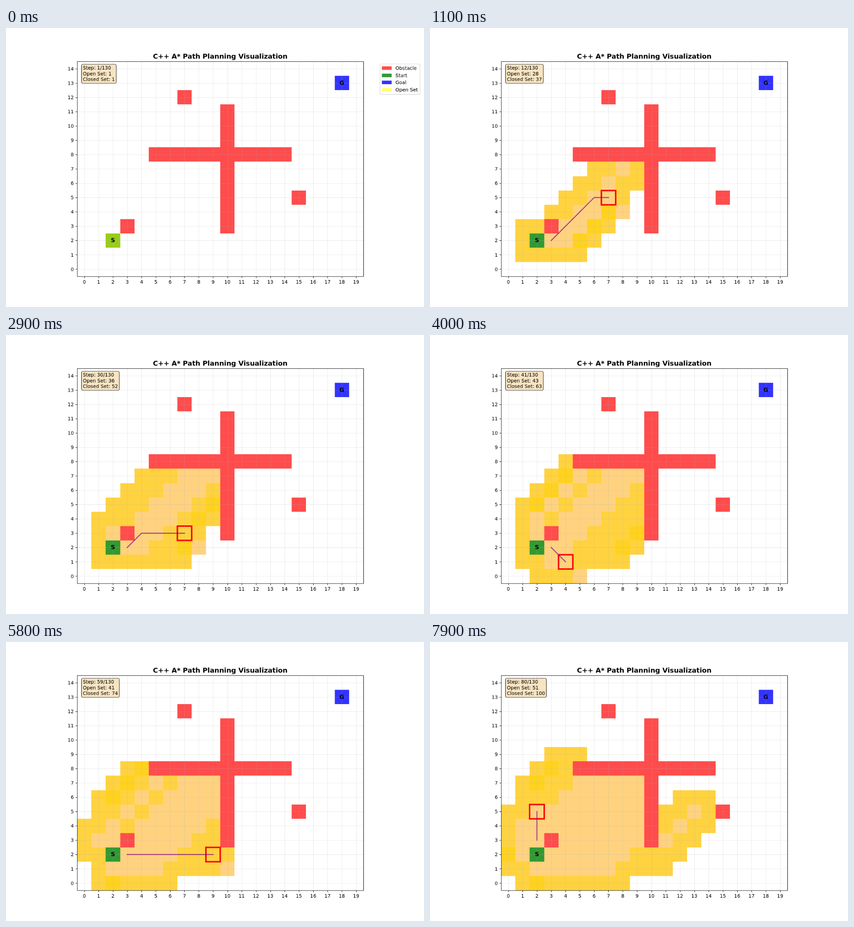
Animation of 917 by 611 pixels, one loop 8 s. Source, as an HTML page with a canvas:

```html
<!DOCTYPE html>
<html lang="en">
<head>
<meta charset="utf-8">
<title>C++ A* Path Planning Visualization</title>
<style>
html, body { margin: 0; width: 100%; height: 100%; overflow: hidden; background: #fff; }
canvas { display: block; width: 917px; height: 611px; }
</style>
</head>
<body>
<canvas id="stage" width="917" height="611"></canvas>
<script>
const COLS = 20, ROWS = 15, STEPS = 80, TOTAL = 130, STEP_MS = 100;
const START = { x: 2, y: 2 }, GOAL = { x: 18, y: 13 };

// ---------- search ----------
const id = (x, y) => y * COLS + x;
const startId = id(START.x, START.y);
const walls = new Set([id(3, 3), id(7, 12), id(15, 5)]);
for (let x = 5; x <= 14; x++) walls.add(id(x, 8));
for (let y = 3; y <= 11; y++) walls.add(id(10, y));

function search() {
  const cost = new Map([[startId, 0]]), from = new Map();
  const open = [{ cell: startId, f: 0 }];
  const states = [{ open: [startId], closed: [startId], path: [] }];

  while (states.length < STEPS) {
    let best = 0;
    open.forEach((n, i) => { if (n.f < open[best].f) best = i; });
    const cur = open.splice(best, 1)[0].cell;
    const waiting = open.map(n => n.cell);
    const cx = cur % COLS, cy = Math.floor(cur / COLS);

    for (let dy = -1; dy <= 1; dy++) for (let dx = -1; dx <= 1; dx++) {
      const x = cx + dx, y = cy + dy, next = id(x, y);
      if (!dx && !dy || x < 0 || y < 0 || x >= COLS || y >= ROWS || walls.has(next)) continue;
      const g = cost.get(cur) + Math.hypot(dx, dy);
      if (cost.has(next) && g > cost.get(next) - 1e-9) continue;
      cost.set(next, g);
      from.set(next, cur);
      // the tiny factor settles ties in favour of cells nearer the goal
      open.push({ cell: next, f: g + Math.hypot(GOAL.x - x, GOAL.y - y) * (1 + 1e-7) });
    }

    const path = [];
    for (let c = cur; c !== startId; c = from.get(c)) path.unshift(c);
    states.push({ open: waiting, closed: [...cost.keys()], path });
  }
  return states;
}
const states = search();

// ---------- drawing ----------
const W = 1200, H = 800;
const LEFT = 204.333, TOP = 96, CELL = 41.0667;
const RIGHT = LEFT + CELL * COLS, BOTTOM = TOP + CELL * ROWS;
const PT = 100 / 72, EM = 10 * PT;

const stage = document.getElementById('stage').getContext('2d');
const sheet = document.createElement('canvas');
sheet.width = W;
sheet.height = H;
const ctx = sheet.getContext('2d');

const edgeX = x => Math.round(LEFT + x * CELL);
const edgeY = y => Math.round(BOTTOM - y * CELL);
const midX = x => LEFT + (x + 0.5) * CELL;
const midY = y => BOTTOM - (y + 0.5) * CELL;
const crisp = v => Math.round(v) + 0.5;

function bounds(cell) {
  const x = cell % COLS, y = Math.floor(cell / COLS);
  const l = edgeX(x), t = edgeY(y + 1);
  return [l, t, edgeX(x + 1) - l, edgeY(y) - t];
}

function fillCells(cells, color) {
  ctx.fillStyle = color;
  for (const c of cells) ctx.fillRect(...bounds(c));
}

function text(str, x, y, size = 10, align = 'left', weight = 'normal') {
  ctx.font = `${weight} ${size * PT}px "DejaVu Sans", sans-serif`;
  ctx.textAlign = align;
  ctx.fillStyle = '#000';
  ctx.fillText(str, x, y);
}

function line(points, color, width) {
  ctx.strokeStyle = color;
  ctx.lineWidth = width;
  ctx.beginPath();
  points.forEach(([x, y]) => ctx.lineTo(x, y));
  ctx.stroke();
}

function panel(x, y, w, h, r, fill, edge) {
  ctx.beginPath();
  ctx.roundRect(x, y, w, h, r);
  ctx.fillStyle = fill;
  ctx.fill();
  ctx.strokeStyle = edge;
  ctx.lineWidth = PT;
  ctx.stroke();
}

const RED = 'rgba(255,0,0,.7)', GREEN = 'rgba(0,128,0,.8)';
const BLUE = 'rgba(0,0,255,.8)', YELLOW = 'rgba(255,255,0,.5)';

function drawGrid() {
  const grid = 'rgba(176,176,176,.3)', lw = 0.8 * PT;
  for (let i = 0; i < COLS; i++) {
    const x = crisp(midX(i));
    line([[x, TOP], [x, BOTTOM]], grid, lw);
  }
  for (let i = 0; i < ROWS; i++) {
    const y = crisp(midY(i));
    line([[LEFT, y], [RIGHT, y]], grid, lw);
  }
}

function drawAxes() {
  const lw = 0.8 * PT, tick = 3.5 * PT;
  for (let i = 0; i < COLS; i++) {
    const x = crisp(midX(i));
    line([[x, BOTTOM + 0.5], [x, BOTTOM + 0.5 + tick]], '#000', lw);
    text(i, midX(i), BOTTOM + 20.5, 10, 'center');
  }
  for (let i = 0; i < ROWS; i++) {
    const y = crisp(midY(i));
    line([[LEFT, y], [LEFT - tick, y]], '#000', lw);
    text(i, LEFT - 2 * tick, midY(i) + 5.1, 10, 'right');
  }
  ctx.strokeStyle = '#000';
  ctx.lineWidth = lw;
  const l = crisp(LEFT), t = crisp(TOP);
  ctx.strokeRect(l, t, crisp(RIGHT) - l, crisp(BOTTOM) - t);
  text('C++ A* Path Planning Visualization', (LEFT + RIGHT) / 2, 87.7, 14, 'center', 'bold');
}

function drawInfo(n, state) {
  const lines = [
    `Step: ${n}/${TOTAL}`,
    `Open Set: ${state.open.length}`,
    `Closed Set: ${state.closed.length}`
  ];
  const x = 220.8, y = 108.3, pad = 0.3 * EM;
  ctx.font = `${EM}px "DejaVu Sans", sans-serif`;
  const w = Math.max(...lines.map(s => ctx.measureText(s).width));
  panel(x - pad, y - pad, w + 2 * pad, 54.5, pad, 'rgba(245,222,179,.8)', 'rgba(0,0,0,.8)');
  lines.forEach((s, i) => text(s, x, y + 11 + i * 16.5));
}

function drawLegend() {
  const x = 1073.7, y = 102.9;
  panel(x, y, 114.7, 87.6, 0.2 * EM, '#fff', 'rgba(204,204,204,.8)');
  [['Obstacle', RED], ['Start', GREEN], ['Goal', BLUE], ['Open Set', YELLOW]].forEach(([name, color], i) => {
    const mid = 115.2 + i * 20.5;
    ctx.fillStyle = color;
    ctx.fillRect(1079, Math.round(mid - 5), 28, 10);
    text(name, 1118.1, mid + 5);
  });
}

function draw(i) {
  const state = states[i], path = state.path;
  ctx.fillStyle = '#fff';
  ctx.fillRect(0, 0, W, H);

  fillCells(walls, RED);
  fillCells([startId], GREEN);
  fillCells([id(GOAL.x, GOAL.y)], BLUE);
  fillCells(state.open, YELLOW);
  fillCells(state.closed.filter(c => c !== startId), 'rgba(255,165,0,.5)');

  if (path.length) {
    ctx.strokeStyle = '#f00';
    ctx.lineWidth = 3 * PT;
    ctx.strokeRect(...bounds(path[path.length - 1]));
  }
  drawGrid();
  if (path.length > 1) {
    ctx.lineJoin = 'round';
    ctx.lineCap = 'square';
    line(path.map(c => [midX(c % COLS), midY(Math.floor(c / COLS))]), 'rgba(128,0,128,.7)', 2 * PT);
    ctx.lineJoin = 'miter';
    ctx.lineCap = 'butt';
  }
  drawAxes();
  text('S', midX(START.x), midY(START.y) + 5, 12, 'center', 'bold');
  text('G', midX(GOAL.x), midY(GOAL.y) + 5, 12, 'center', 'bold');
  drawInfo(i + 1, state);
  if (i === 0) drawLegend();

  stage.imageSmoothingQuality = 'high';
  stage.drawImage(sheet, 0, 0, 917, 611);
}

function tick() {
  draw(Math.floor(performance.now() / STEP_MS) % STEPS);
  requestAnimationFrame(tick);
}
tick();
</script>
</body>
</html>
```
